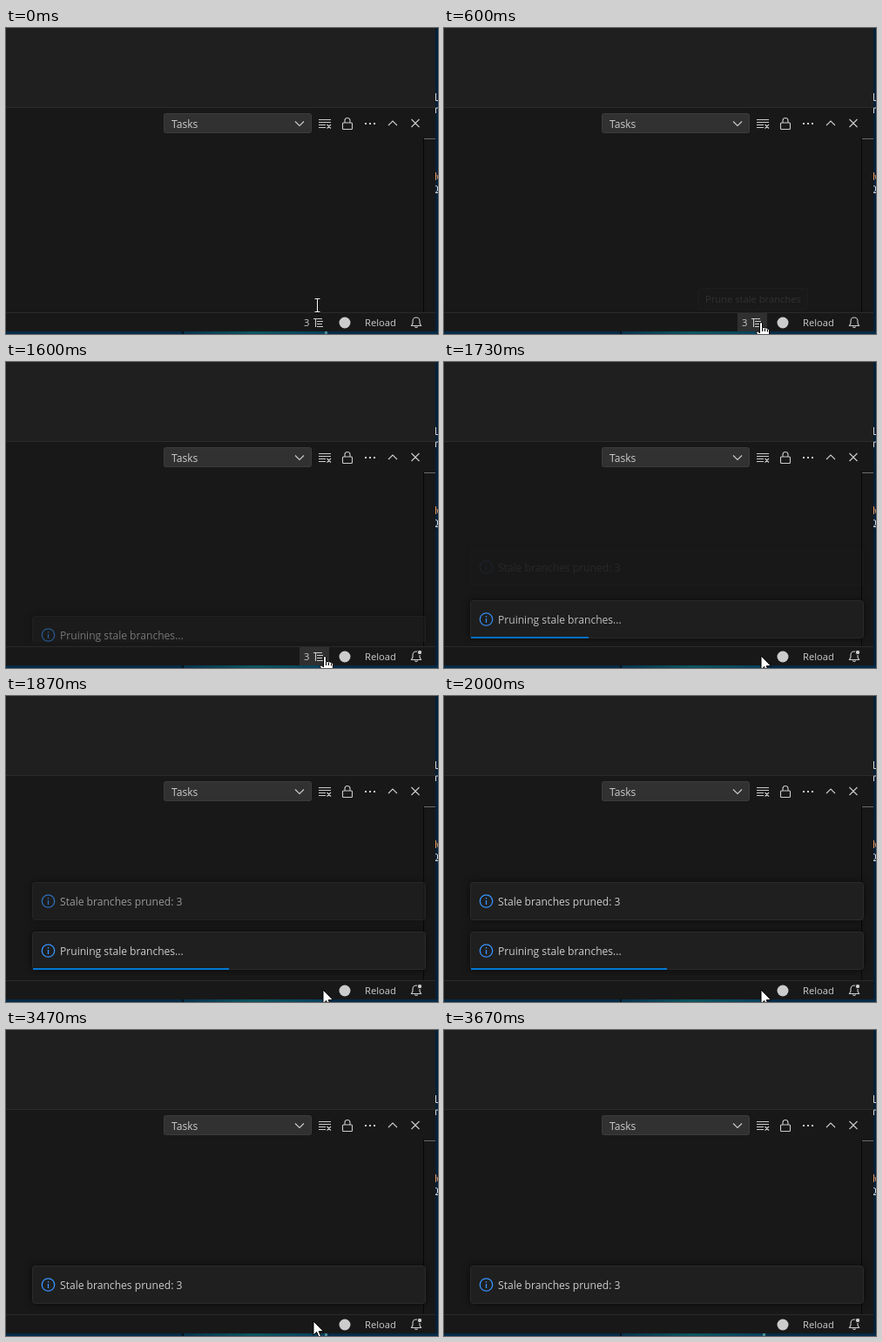
Write an HTML page that moves like this. It is 496 by 352 pixels and loops after 5140 ms.

```html
<!DOCTYPE html>
<html lang="en">
<head>
<meta charset="utf-8">
<title>Prune stale branches</title>
<style>
  html, body { margin: 0; width: 496px; height: 352px; overflow: hidden; background: #181818; }
  svg { display: block; }
  text { font: 12.1px "Open Sans", "Noto Sans", sans-serif; fill: #ccc; }
  .small { font-size: 11.2px; }
  .icon { fill: none; stroke: #ccc; stroke-width: 1.1; }
  .crisp { shape-rendering: crispEdges; }
  .card { fill: #1f1f1f; stroke: #2b2b2b; filter: drop-shadow(0 0 4px #0009); }
  .info { fill: none; stroke: #3794ff; stroke-width: 1.3; }
</style>
</head>
<body>
<svg width="496" height="352" viewBox="0 0 496 352">
  <defs>
    <clipPath id="toastArea"><rect width="496" height="322"/></clipPath>
    <linearGradient id="strip">
      <stop offset="0" stop-color="#06334f"/>
      <stop offset=".5" stop-color="#0d5560"/>
      <stop offset="1" stop-color="#07405f"/>
    </linearGradient>
  </defs>

  <!-- window behind -->
  <g class="crisp">
    <rect width="496" height="352" fill="#052b49"/>
    <rect x="493" width="3" height="349" fill="#03203a"/>
    <rect x="204" y="349" width="162" height="3" fill="url(#strip)"/>
    <rect x="202" y="349" width="2" height="3" fill="#02121d"/>
    <rect x="366" y="349" width="3" height="3" fill="#4b8b96"/>
  </g>
  <path d="M493.5 75V83.500H496M493.500 98V92H496M493 181.500L495.500 182.500V187L493 189.500H496" fill="none" stroke="#d8d8d8"/>
  <path d="M493.500 166V175M495 169L496 174" fill="none" stroke="#e79a62"/>

  <!-- editor, panel, status bar -->
  <g class="crisp">
    <rect width="493" height="91" fill="#1f1f1f"/>
    <rect y="91" width="493" height="258" fill="#181818"/>
    <path d="M0 91.500H493M0 327.500H493" stroke="#2b2b2b"/>
    <path d="M479.500 126V327" stroke="#080808"/>
    <path d="M480 127H493" stroke="#6b6b6b"/>
  </g>

  <rect x="181.500" y="98.500" width="169" height="22" rx="2" fill="#313131" stroke="#3c3c3c"/>
  <text x="190" y="115">Tasks</text>
  <g class="icon">
    <path d="M332 107.500L337 112.500L342 107.500M439 112L444 107L449 112M465.500 105L474.500 114M474.500 105L465.500 114"/>
    <path d="M359 105.500H373M359 108.500H373M359 111.500H367M359 114.500H367M368.500 111L373 115.500M373 111L368.500 115.500"/>
    <rect x="386.500" y="109" width="11" height="7.500" rx="1"/>
    <path d="M389 109V106.500a3 3 0 0 1 6 0V109"/>
  </g>
  <path d="M412 110h2m3 0h2m3 0h2" stroke="#ccc" stroke-width="2"/>

  <g id="prune">
    <rect id="hover" class="crisp" x="337" y="328" width="34" height="21" fill="#303030"/>
    <text class="small" x="342" y="343">3</text>
    <path class="icon" d="M353 334.500H363M357 337.500H364M357 340.500H363M357 343.500H364M355.500 334V344"/>
  </g>
  <circle cx="389" cy="339" r="6.500" fill="#ccc"/>
  <text class="small" x="412" y="343">Reload</text>
  <path class="icon" d="M465.500 342.500H476.500L475 339.500V337a4 4 0 0 0-8 0V339.500ZM469.500 343.500a1.600 1.600 0 0 0 3 0"/>
  <circle id="dot" cx="475" cy="334" r="2.700" fill="#ccc" stroke="#181818"/>

  <g id="tip">
    <rect x="291.500" y="299.500" width="126" height="24" rx="3" fill="#202020" stroke="#454545"/>
    <path d="M350 323.500L354 327.500L358 323.500" fill="#202020" stroke="#454545"/>
    <text class="small" x="300" y="316">Prune stale branches</text>
  </g>

  <g clip-path="url(#toastArea)">
    <g id="working">
      <rect class="card" x="30.500" y=".5" width="451" height="43" rx="3"/>
      <g class="info"><circle cx="48.500" cy="22" r="7.200"/><path d="M48.500 21V26M48.500 18V19.500"/></g>
      <text x="62" y="27">Pruining stale branches...</text>
      <rect id="bar" x="31" y="42" height="2" fill="#0078d4"/>
    </g>
    <g id="done">
      <rect class="card" x="30.500" y=".5" width="451" height="43" rx="3"/>
      <g class="info"><circle cx="48.500" cy="22" r="7.200"/><path d="M48.500 21V26M48.500 18V19.500"/></g>
      <text x="62" y="27">Stale branches pruned: 3</text>
    </g>
  </g>

  <!-- pointers, hot spot at 0,0 -->
  <g id="beam" fill="none">
    <path d="M-3 -7.500H-.5L0 -7L.5 -7.500H3M0 -7V7M-3 7.500H-.5L0 7L.5 7.500H3" stroke="#000" stroke-width="2.400"/>
    <path d="M-3 -7.500H-.5L0 -7L.5 -7.500H3M0 -7V7M-3 7.500H-.5L0 7L.5 7.500H3" stroke="#fff" stroke-width="1.100"/>
  </g>
  <g id="hand">
    <path d="M-1.500 1a1.500 1.500 0 0 1 3 0V5.500L4.500 5.500L7.500 6.500L9.500 8V13L8 19H-.5L-5.500 11.500L-5 10L-3.500 10L-1.500 12Z" fill="#fff" stroke="#000"/>
    <path d="M1.500 6V10M4.500 6.500V10M7.500 7.500V10.500" stroke="#000"/>
  </g>
  <path id="arrow" d="M0 0V16L3.700 12.500L6.200 18.500L8.700 17.500L6.200 11.700H11.500Z" fill="#fff" stroke="#000"/>
</svg>

<script>
const LOOP = 5140;
// The picture only refreshes at these times
const TICKS = [0, 70, 130, 200, 270, 600, 670, 730, 930, 1470, 1530, 1600, 1670, 1730,
  1800, 1870, 1930, 2000, 2200, 2330, 3470, 3530, 3600, 3670];
// time, pointer, x, y
const POINTER = [
  [0, "beam", 357, 319], [70, "beam", 358, 323], [130, "hand", 362, 333],
  [200, "hand", 366, 338], [270, "hand", 364, 339], [930, "hand", 366, 339],
  [1730, "arrow", 364, 338], [2330, "arrow", 365, 338], [3470, "arrow", 353, 335],
  [3530, "arrow", 312, 339], [3600, "arrow", 257, 346], [3670, "", 0, 0]
];

const $ = id => document.getElementById(id);
const show = (id, on) => $(id).setAttribute("visibility", on ? "visible" : "hidden");
const move = (id, x, y) => $(id).setAttribute("transform", `translate(${x} ${y})`);
const ramp = (t, from, span) => Math.min(1, Math.max(0, (t - from) / span));
const easeOut = p => 1 - (1 - p) ** 1.6;

function draw(time) {
  const t = TICKS.findLast(tick => tick <= time);

  const [, kind, x, y] = POINTER.findLast(step => step[0] <= t);
  for (const id of ["beam", "hand", "arrow"]) show(id, id === kind);
  if (kind) move(kind, kind === "beam" ? x + .5 : x, y);

  const pruned = t >= 1730;
  $("prune").style.display = pruned ? "none" : "";
  show("hover", t >= 130);
  show("dot", t >= 1470);
  $("tip").style.opacity = t < 1470 ? ramp(t, 580, 150) : 0;

  const rise = easeOut(ramp(t, 1490, 300));
  $("working").style.opacity = t < 2200 ? rise : 0;
  move("working", 0, 271 + Math.round(44 * (1 - rise)));
  $("bar").setAttribute("width", 225 * ramp(t, 1670, 100));

  $("done").style.opacity = easeOut(ramp(t, 1715, 285));
  move("done", 0, t < 2200 ? 214 : 271);
}

const start = performance.now();
function frame() {
  draw((performance.now() - start) % LOOP);
  requestAnimationFrame(frame);
}
frame();
</script>
</body>
</html>
```
